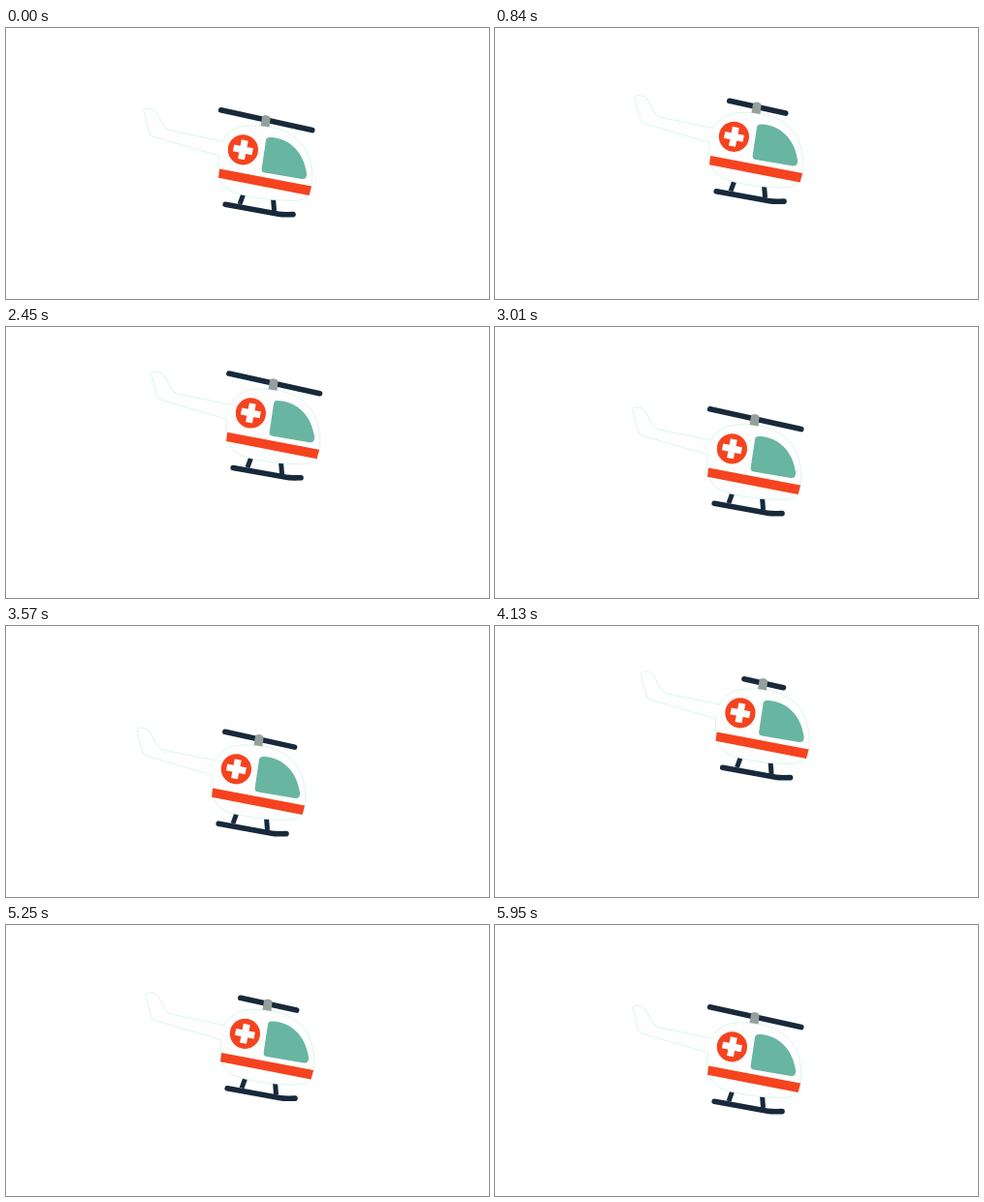
Animation, 498 px wide and 280 px high, one loop 6020 ms. Source, as an HTML page:

```html
<!DOCTYPE html>
<html lang="en">
<head>
<meta charset="utf-8">
<title>Rescue helicopter</title>
<style>
  html, body { margin: 0; width: 100%; height: 100%; overflow: hidden; background: #fff; }
  svg { display: block; width: 498px; height: 280px; }
  .shell { fill: #fdfefd; stroke: #d3f3eb; stroke-width: .8; stroke-linejoin: round; }
  .dark { fill: none; stroke: #17293a; stroke-width: 5.6; stroke-linecap: round; stroke-linejoin: round; }
  .red { fill: #f5431f; }
</style>
</head>
<body>
<svg viewBox="0 0 498 280" aria-label="Helicopter">
  <g id="craft">
    <path class="dark" d="M245 171L241 182M275.5 176L276.5 189" style="stroke-width:5;stroke-linecap:butt"/>
    <path class="dark" d="M226.2 182.3L281 192.2Q285 193 296 192.6"/>
    <path class="shell" d="M142 86Q141 83 147 83Q153 83 155 87L162 100Q164 105 170 106L223 117
      C230 104 242 100 258 101C284 101 304 112 311 130C316 142 317 156 314 168
      Q311 179 295 178.500C272 178 250 175 236 170C222 165 217 153 219.500 132L151 112Q148 111 147.500 108Z"/>
    <path class="red" d="M220.200 145.500L315 163.600L312.500 173L219 154.800Z"/>
    <circle class="red" cx="244.400" cy="125.800" r="15.600"/>
    <path d="M-10 0H10M0 -10V10" stroke="#fff" stroke-width="7" transform="translate(244.400 125.800) rotate(11)"/>
    <path fill="#68b5a2" d="M268 116Q268.500 112.500 273 113C293 114 307 129 310 150Q310.500 156.500 305 156
      L267 149.600Q263 149 263.700 145Z"/>
    <path id="rotor" class="dark"/>
    <path fill="#959f9c" d="M264 92Q264.500 90 268 90Q272 90.500 272.500 93L271.500 102.500L262.500 101Z"/>
  </g>
</svg>
<script>
  const STEP = 70, STEPS = 86, CYCLE = 21;
  const craft = document.getElementById("craft");
  const rotor = document.getElementById("rotor");

  // Pairs of step and value within one hover cycle
  const rise = [[0, 0], [2, 28], [4, 43], [5, 43.5], [8, 22], [11, -13.5], [14, -48.5], [16, -36], [17, -20.5], [20, 0]];
  const drift = [[0, 0], [2, -6], [4, -9.5], [5, -10], [8, -7], [11, 2], [14, 11], [16, 8.5], [17, 5], [20, 0]];
  const spin = [[0, 0], [4, 103.5], [11, 308], [16, 424.5], [20, 540]];

  function at(points, k) {
    const i = Math.max(1, points.findIndex(p => p[0] >= k));
    const [k0, v0] = points[i - 1], [k1, v1] = points[i];
    return v0 + (v1 - v0) * (k - k0) / (k1 - k0);
  }

  function draw(now) {
    const n = Math.floor(now / STEP) % STEPS;
    const k = (n + CYCLE - 1) % CYCLE;   // the cycle ends on its opening pose
    const s = Math.abs(Math.cos(at(spin, k) * Math.PI / 180));
    const dx = 47 * s, dy = 10.4 * s;
    craft.setAttribute("transform", `translate(${at(drift, k)} ${at(rise, k)})`);
    rotor.setAttribute("d", `M${268.7 - dx} ${95.2 - dy}L${268.7 + dx} ${95.2 + dy}`);
  }

  const start = performance.now();
  function tick() {
    draw(performance.now() - start);
    requestAnimationFrame(tick);
  }
  tick();
</script>
</body>
</html>
```
